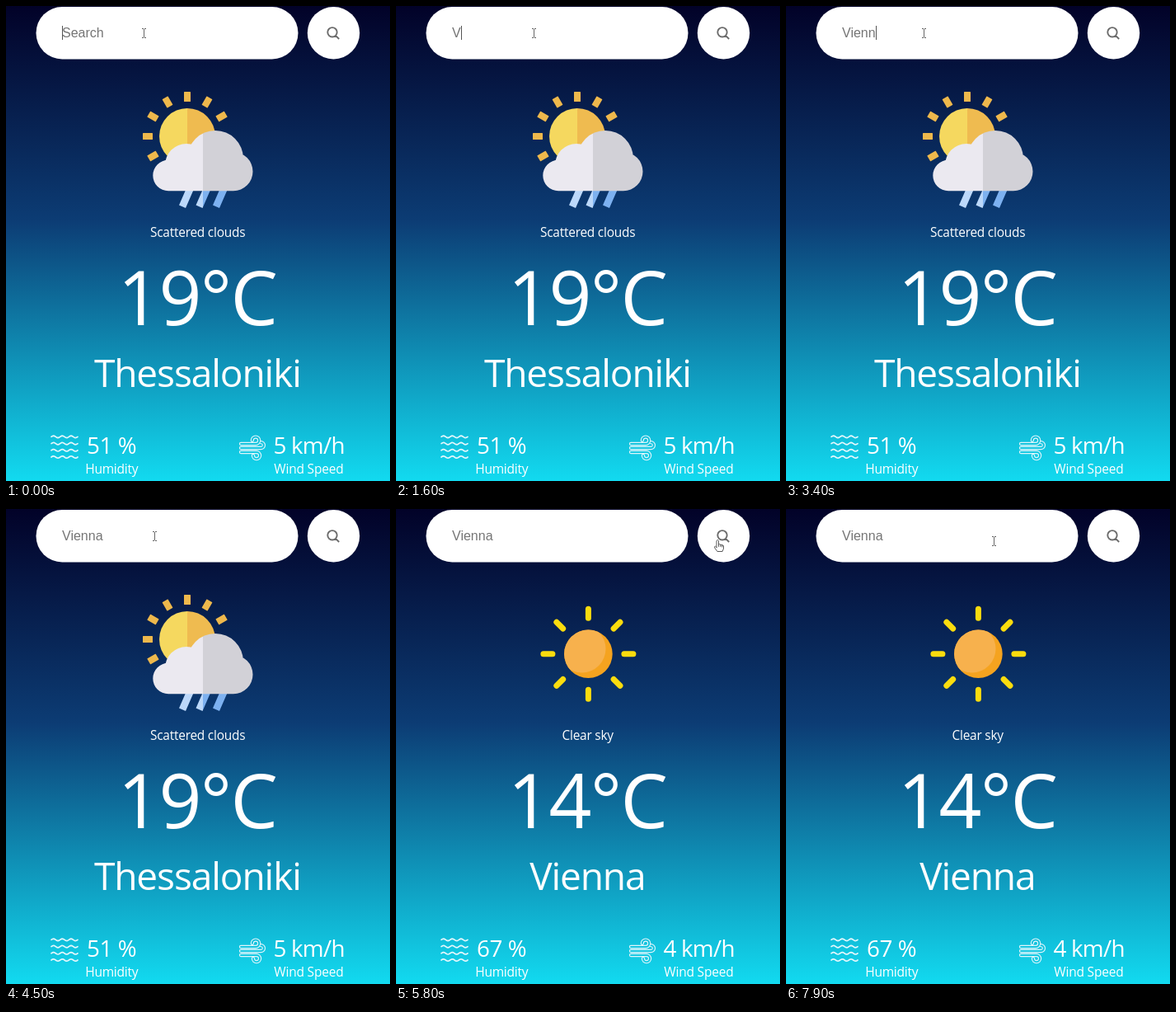
Recreate the animation shown at these times as an HTML page with a canvas. Size 466 by 576 pixels, loop 8000 ms.

```html
<!DOCTYPE html>
<html lang="en">
<head>
<meta charset="utf-8">
<title>Weather search</title>
<style>
  html, body { margin: 0; width: 100%; height: 100%; overflow: hidden; background: #020228; }
  canvas { display: block; width: 466px; height: 576px; }
</style>
</head>
<body>
<canvas id="stage" width="466" height="576"></canvas>
<script>
const ctx = document.getElementById('stage').getContext('2d');
const W = 466, H = 576, LOOP = 8000, TAU = Math.PI * 2;
const UI = '"Open Sans", "Noto Sans", sans-serif';
const INPUT = '"Liberation Sans", Arial, sans-serif';
const BLINK = 520, SWAP = 5795, BLUR = 5400;

const sky = ctx.createLinearGradient(0, 0, 0, H);
sky.addColorStop(0, '#020228');
sky.addColorStop(0.45, '#0c3c74');
sky.addColorStop(1, '#12daf0');

const cities = [
  { name: 'Thessaloniki', temp: '19°C', sky: 'Scattered clouds', humidity: '51 %', wind: '5 km/h', icon: rainCloud },
  { name: 'Vienna', temp: '14°C', sky: 'Clear sky', humidity: '67 %', wind: '4 km/h', icon: clearSun }
];
const word = 'Vienna';
const keyTimes = [1490, 2290, 2790, 3290, 3390, 3470];

// Pointer stops: time, x, y; eased between neighbours
const pointer = [
  [0, 167, 33], [3920, 167, 33], [4000, 182, 33], [4150, 182, 33],
  [4200, 184, 33], [4300, 180, 33], [4520, 180, 33], [5280, 391.5, 44],
  [6920, 391.5, 44], [7090, 252, 43], [7720, 252, 43], [7890, 252, 39], [LOOP, 252, 39]
];

function pointerAt(t) {
  const i = Math.max(1, pointer.findIndex(p => p[0] > t));
  const [t0, x0, y0] = pointer[i - 1], [t1, x1, y1] = pointer[i];
  const u = (t - t0) / (t1 - t0), e = u * u * (3 - 2 * u);
  return [x0 + (x1 - x0) * e, y0 + (y1 - y0) * e];
}

function label(str, x, y, size, align = 'left', spacing = 0, color = '#fff', family = UI) {
  ctx.font = `${size}px ${family}`;
  ctx.letterSpacing = spacing + 'px';
  ctx.textAlign = align;
  ctx.fillStyle = color;
  ctx.fillText(str, x, y);
}

function disc(x, y, r, color) {
  ctx.fillStyle = color;
  ctx.beginPath();
  ctx.arc(x, y, r, 0, TAU);
  ctx.fill();
}

function pill(x, y, w, h, r, color) {
  ctx.fillStyle = color;
  ctx.beginPath();
  ctx.roundRect(x, y, w, h, r);
  ctx.fill();
}

function ray(x, y, angle, dist, len, width, r, color) {
  ctx.save();
  ctx.translate(x, y);
  ctx.rotate(angle);
  pill(dist - len / 2, -width / 2, len, width, r, color);
  ctx.restore();
}

// Fill a path in two colours, split at x
function splitFill(path, x, left, right) {
  ctx.save();
  ctx.clip(path);
  ctx.fillStyle = left;
  ctx.fillRect(0, 0, x, H);
  ctx.fillStyle = right;
  ctx.fillRect(x, 0, W - x, H);
  ctx.restore();
}

function rainCloud() {
  for (let i = 0; i < 7; i++) {
    ray(220, 158, (150 + i * 30) * Math.PI / 180, 48, 12, 8, 0.5, '#eeb84c');
  }
  const sun = new Path2D();
  sun.arc(220, 158, 34, 0, TAU);
  splitFill(sun, 220, '#f5d85f', '#efbb50');

  const rain = new Path2D();
  for (let i = 0; i < 3; i++) {
    const x = i * 20.5;
    rain.moveTo(218.5 + x, 222);
    rain.lineTo(228 + x, 222);
    rain.lineTo(218 + x, 245);
    rain.lineTo(210 + x, 241.5);
    rain.closePath();
  }
  splitFill(rain, 239, '#bcd8fa', '#7db1f0');

  const cloud = new Path2D();
  for (const [x, y, r] of [[197, 205.5, 18.7], [219, 193, 26], [254, 185, 34], [276, 200.7, 23.5]]) {
    cloud.moveTo(x + r, y);
    cloud.arc(x, y, r, 0, TAU);
  }
  cloud.rect(197, 200, 79, 24.2);
  splitFill(cloud, 239, '#ebe9f0', '#d2d1d7');
}

function clearSun() {
  const x = 233.4, y = 175.7;
  for (let i = 0; i < 8; i++) ray(x, y, i * TAU / 8, 49, 18, 7, 3.5, '#fbdc0e');
  disc(x, y, 29.3, '#f5a31f');
  ctx.save();
  ctx.beginPath();
  ctx.arc(x, y, 29.3, 0, TAU);
  ctx.clip();
  disc(225.5, 169.5, 29, '#f7b14d');
  ctx.restore();
}

function humidityIcon() {
  ctx.strokeStyle = '#e4f7fc';
  ctx.lineWidth = 1.7;
  ctx.lineCap = 'round';
  ctx.beginPath();
  for (let row = 0; row < 4; row++) {
    for (let x = 0; x <= 32; x++) {
      const y = 522.4 + row * 8.2 - 1.2 * Math.sin(x / 32 * TAU * 3);
      x ? ctx.lineTo(55 + x, y) : ctx.moveTo(55, y);
    }
  }
  ctx.stroke();
}

function windIcon() {
  const gusts = new Path2D();
  const gust = (x, y, r, dir, turn) => {
    gusts.moveTo(285, y);
    gusts.lineTo(x, y);
    gusts.arc(x, y + dir * r, r, -dir * Math.PI / 2, dir * (turn - Math.PI / 2), dir < 0);
  };
  gust(303, 531, 4.2, -1, Math.PI * 1.5);
  gust(309.5, 536, 3.4, -1, Math.PI);
  gust(304, 541, 4.1, 1, Math.PI * 1.5);
  ctx.lineCap = 'round';
  for (const [width, color] of [[4.3, '#def5fb'], [2, sky]]) {
    ctx.lineWidth = width;
    ctx.strokeStyle = color;
    ctx.stroke(gusts);
  }
}

function searchBar(t) {
  pill(36.5, 1, 318, 63.5, 31.75, '#fff');
  disc(397.5, 32.7, 31.7, '#fff');
  ctx.strokeStyle = '#6c6c6c';
  ctx.lineWidth = 1.9;
  ctx.lineCap = 'butt';
  ctx.beginPath();
  ctx.arc(396, 31.8, 5.7, 0, TAU);
  ctx.moveTo(400, 35.8);
  ctx.lineTo(404.2, 40);
  ctx.stroke();

  const count = keyTimes.filter(k => k <= t).length;
  const typed = word.slice(0, count);
  label(typed || 'Search', 68, 38, 16, 'left', 0, '#757575', INPUT);
  const since = t - (count ? keyTimes[count - 1] : -40);
  if (t < BLUR && Math.floor(since / BLINK) % 2 === 0) {
    ctx.fillStyle = '#555';
    ctx.fillRect(68 + Math.round(ctx.measureText(typed).width), 24, 1, 17);
  }
}

function iBeam(x, y) {
  x = Math.round(x);
  y = Math.round(y);
  ctx.fillStyle = '#666';
  ctx.fillRect(x, y - 5, 1, 10);
  for (const dy of [-6, 5]) {
    ctx.fillRect(x - 2, y + dy, 2, 1);
    ctx.fillRect(x + 1, y + dy, 2, 1);
  }
}

function outlined(path, x, y) {
  ctx.save();
  ctx.translate(x, y);
  ctx.lineJoin = 'round';
  ctx.lineWidth = 0.9;
  ctx.fillStyle = '#fff';
  ctx.strokeStyle = '#4a4a4a';
  ctx.fill(path);
  ctx.stroke(path);
  ctx.restore();
}

const hand = new Path2D('M-2.5 1 V-5.5 Q-1.3 -7.6 0 -5.5 V-1 Q1.3 -2.2 2.3 -.6 Q3.6 -1.5 4.3 0 Q5.8 -.6 6 1 V4 L4.6 7.5 H-1.6 L-4.8 3 Q-5.4 1.2 -4 1.2 L-2.5 2.6 Z M0 -1 V1.4 M2.3 -.6 V1.6 M4.3 0 V2');
const arrow = new Path2D('M-3 -6 V6 L0 3.4 L2 8 L4 7.2 L2 2.8 H6 Z');

function drawPointer(t) {
  const [x, y] = pointerAt(t);
  if (x < 354) iBeam(x, y);
  else if (x < 366) outlined(arrow, x, y);
  else outlined(hand, x, y);
}

function draw(t) {
  const city = cities[t < SWAP ? 0 : 1];
  ctx.fillStyle = sky;
  ctx.fillRect(0, 0, W, H);
  searchBar(t);
  city.icon();
  label(city.sky, 232.7, 280, 15.4, 'center', -0.2);
  label(city.temp, 135.5, 387, 91, 'left', -2);
  label(city.name, 232.3, 462, 46, 'center', -1.1);
  humidityIcon();
  label(city.humidity, 98, 543, 27.8, 'left', -0.4);
  label('Humidity', 96.2, 566.5, 15.5, 'left', -0.25);
  windIcon();
  label(city.wind, 324.4, 543, 27.8, 'left', -0.75);
  label('Wind Speed', 325.3, 566.5, 15.5, 'left', -0.2);
  drawPointer(t);
}

let start;
function tick(now) {
  start ??= now;
  draw((now - start) % LOOP);
  requestAnimationFrame(tick);
}
draw(0);
requestAnimationFrame(tick);
</script>
</body>
</html>
```
